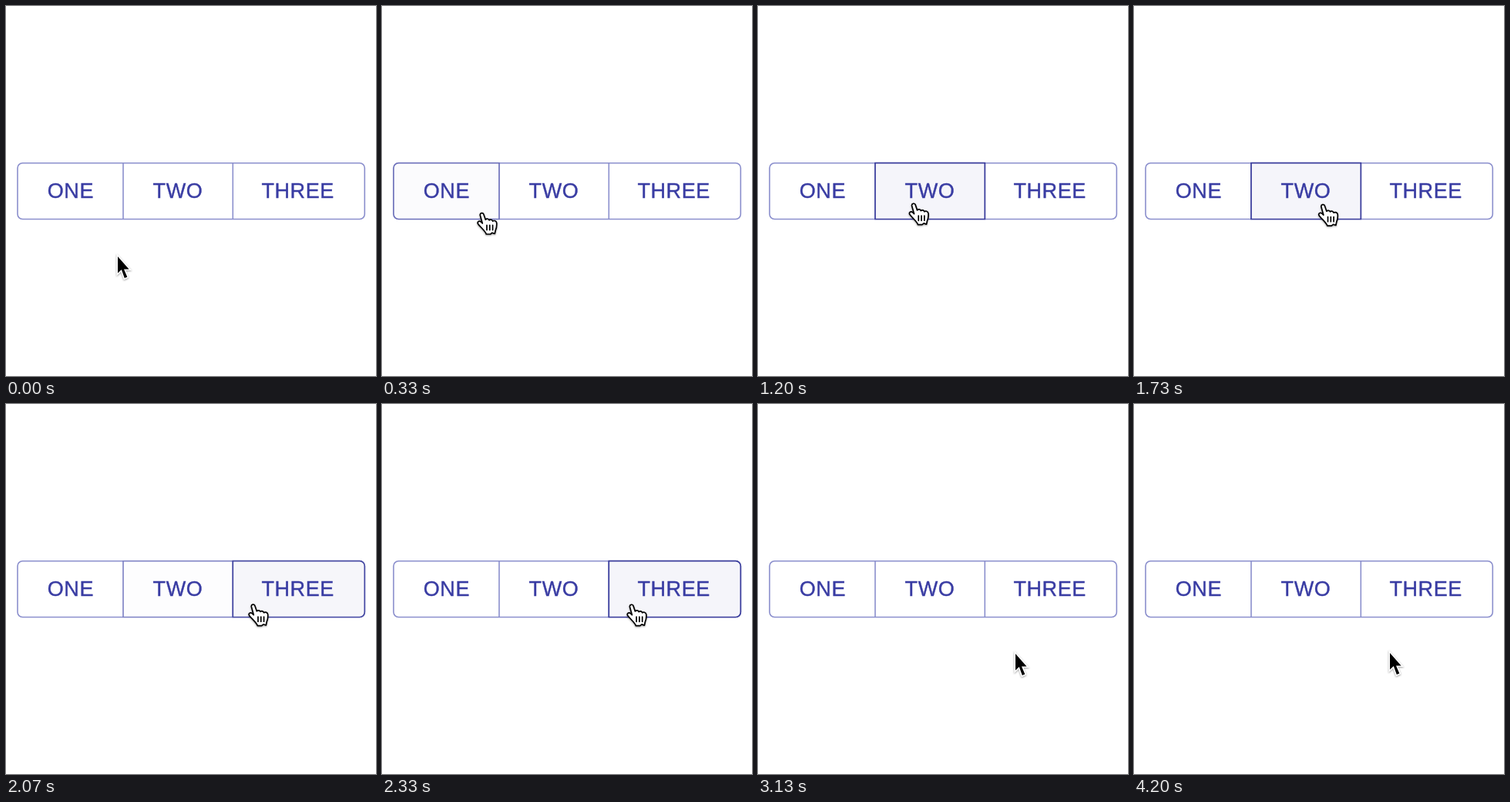
These frames come from a looping animation (480x480 px, 4790 ms). An HTML page:

```html
<!DOCTYPE html>
<html lang="en">
<head>
<meta charset="utf-8">
<title>Button group</title>
<style>
  html, body { margin: 0; width: 100%; height: 100%; overflow: hidden; background: #fff; }
  svg { display: block; width: 100%; height: 100%; }
  text {
    font: 27px "Liberation Sans", Arial, sans-serif;
    letter-spacing: .6px;
    fill: #393ca3;
    stroke: #393ca3;
    stroke-width: .4;
  }
  .rest { fill: none; stroke: #8b8fcd; stroke-width: 1.6; }
  .hover { fill: #f5f5fa; stroke: #3a3d9c; stroke-width: 1.7; }
  .cursor { filter: drop-shadow(0 1.6px 1.1px rgba(0, 0, 0, .38)); }
</style>
</head>
<body>
<svg viewBox="0 0 480 480">
  <g class="rest">
    <rect x="15" y="203.7" width="450.3" height="72.8" rx="6.5"/>
    <path d="M152 203.7v72.8M294.3 203.7v72.8"/>
  </g>
  <g class="hover">
    <path d="M152 203.7H21.5a6.5 6.5 0 0 0-6.5 6.5V270a6.5 6.5 0 0 0 6.5 6.5H152Z"/>
    <path d="M152 203.7H294.3v72.8H152Z"/>
    <path d="M294.3 203.7H458.8a6.5 6.5 0 0 1 6.5 6.5V270a6.5 6.5 0 0 1-6.5 6.5H294.3Z"/>
  </g>
  <text x="53.7" y="249">ONE</text>
  <text x="190.6" y="249">TWO</text>
  <text x="331.4" y="249">THREE</text>
  <g id="pointer">
    <g id="arrow" class="cursor">
      <path d="M0 0V21.5L4.8 17 8.8 28 12.3 26.5 8 16.4H14.6Z" stroke="#fff" stroke-width="3.2" paint-order="stroke"/>
    </g>
    <g id="hand" class="cursor" transform="translate(-2 -.5)" stroke="#000" stroke-width="1.7" stroke-linecap="round" stroke-linejoin="round">
      <path fill="#fff" d="M-2.6 2.4C-2.8-.6 1-1.2 2 1.4L4.4 8.4C5.8 6.8 8.6 7.2 9.1 9.1 10.6 7.7 13.2 8.3 13.7 10.3 15.6 9.1 18.5 9.8 18.8 12.6 19.1 16 18.8 19 17.4 22L16.4 26.6 13 25.4 10.8 27.2H5.4C4.4 23.6-1.4 18.8-5 14.3-7 11.4-4 9.4-1.6 11.2L.4 13.2Z"/>
      <path fill="none" d="M6.1 15.6v6.2M9.9 15.6v6.2M13.7 15.6v6.2"/>
    </g>
  </g>
</svg>
<script>
const LOOP = 4790, STEP = 200 / 3, FADE = 250;
const [pointer, arrow, hand] = ["pointer", "arrow", "hand"].map(id => document.getElementById(id));
const highlights = document.querySelectorAll(".hover path");

// When the pointer enters ONE, TWO, THREE, and finally leaves.
const crossings = [255, 930, 1915, 2860];

const home = { x: 145, y: 325 };
const moves = [
  { from: 20, to: 450, x: 129, y: 257 },
  { from: 750, to: 1230, x: 205, y: 257 },
  { from: 1470, to: 2130, x: 326, y: 261 },
  { from: 2500, to: 2800, x: 341, y: 272 },
  { from: 2800, to: 3100, x: 334, y: 324 },
  { from: 3430, to: 3600, x: 332, y: 323 }
];

const clamp = v => Math.min(1, Math.max(0, v));
const progress = (t, from, to) => clamp((t - from) / (to - from));
const smooth = k => k * k * (3 - 2 * k);
const easeOut = k => 1 - (1 - smooth(k)) ** 1.7;

function pointerAt(t) {
  let { x, y } = home;
  for (const move of moves) {
    const k = smooth(progress(t, move.from, move.to));
    x += (move.x - x) * k;
    y += (move.y - y) * k;
  }
  return [x, y];
}

function render(time) {
  // The picture advances at 15 frames per second.
  const t = Math.floor((time % LOOP + 3.4) / STEP) * STEP;
  const fade = start => easeOut(progress(t, start, start + FADE));
  highlights.forEach((el, i) =>
    el.setAttribute("opacity", fade(crossings[i]) - fade(crossings[i + 1])));

  const over = t >= crossings[0] && t < crossings[3];
  pointer.setAttribute("transform", `translate(${pointerAt(t)})`);
  arrow.setAttribute("display", over ? "none" : "inline");
  hand.setAttribute("display", over ? "inline" : "none");
}

const start = performance.now();
function tick() {
  render(performance.now() - start);
  requestAnimationFrame(tick);
}
tick();
</script>
</body>
</html>
```
